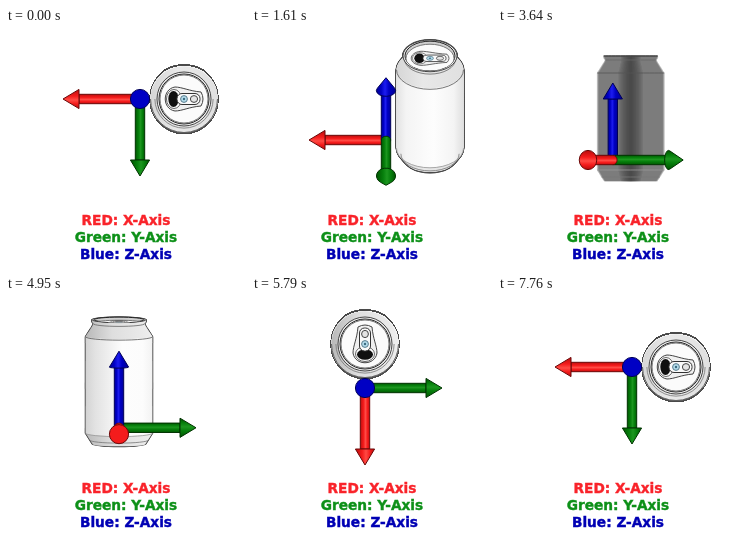
Write an HTML page with a canvas that moves like this. It is 240 by 240 pixels and loops after 7820 ms.

```html
<!DOCTYPE html>
<html lang="en">
<head>
<meta charset="utf-8">
<title>Can axes</title>
<style>
html, body { margin: 0; width: 100%; height: 100%; overflow: hidden; background: #fff; }
canvas { display: block; width: 240px; height: 240px; }
</style>
</head>
<body>
<canvas id="stage"></canvas>
<script>
const LOOP = 7820, STEP = 60, TURN = Math.PI / 30;
const CX = 134, CY = 92;
const ORIGIN = [0, -21, -40], CAN = [-44, -21];
const SHAFT = 61, TIP = 16;

// Can outline: height and radius, bottom to top
const PROFILE = [[-61, 27], [-58, 29], [-50, 34], [47, 34], [58, 27], [60, 26], [62, 27.5], [64, 27.5]];

const AXES = [
  { dir: [1, 0, 0], dark: '#b80c0c', mid: '#f41c1c', light: '#ff4a44', edge: '#6a0808' },
  { dir: [0, 1, 0], dark: '#005400', mid: '#067f0c', light: '#1c961f', edge: '#003200' },
  { dir: [0, 0, 1], dark: '#000094', mid: '#0000c4', light: '#1c1cf0', edge: '#000058' }
];
const LABELS = [
  ['RED: X-Axis', '#f9232a', 197],
  ['Green: Y-Axis', '#0d9018', 214],
  ['Blue: Z-Axis', '#0000b4', 231]
];

const canvas = document.getElementById('stage');
const ctx = canvas.getContext('2d');
const ratio = window.devicePixelRatio || 1;
canvas.width = canvas.height = 240 * ratio;

// Turned steps (0 to 15) of the move that starts at the given time
const steps = (t, start) => Math.max(0, Math.min(15, Math.floor((t - start) / STEP) + 1));

function makeView(t) {
  const tilt = (steps(t, 1130) - steps(t, 4950)) * TURN;
  const yaw = (steps(t, 3040) - steps(t, 6920)) * TURN;
  const ca = Math.cos(yaw), sa = Math.sin(yaw);
  const flat = Math.abs(Math.cos(tilt)), rise = Math.sin(tilt);
  // Screen x, screen y and depth toward the viewer
  const turn = ([x, y, z]) => {
    const px = y * sa - x * ca, py = x * sa + y * ca;
    return [px, py * flat - z * rise, py * rise + z * flat];
  };
  const place = p => {
    const [x, y] = turn(p);
    return [CX + x, CY + y];
  };
  return { flat, turn, place };
}

function oval(x, y, rx, ry, fill, stroke, from = 0, to = Math.PI * 2) {
  ctx.beginPath();
  ctx.ellipse(x, y, rx, Math.max(0, ry), 0, from, to);
  paint(fill, stroke);
}

function paint(fill, stroke) {
  if (fill) { ctx.fillStyle = fill; ctx.fill(); }
  if (stroke) { ctx.strokeStyle = stroke; ctx.stroke(); }
}

function ramp(x0, y0, x1, y1, ...stops) {
  const g = ctx.createLinearGradient(x0, y0, x1, y1);
  stops.forEach(([at, color]) => g.addColorStop(at, color));
  return g;
}

const gray = v => `rgb(${v}, ${v}, ${v})`;

function radiusAt(z) {
  const i = Math.max(1, PROFILE.findIndex(p => p[0] >= z));
  const [z0, r0] = PROFILE[i - 1], [z1, r1] = PROFILE[i];
  return r0 + (r1 - r0) * (z - z0) / (z1 - z0);
}

function drawCan(view) {
  const { flat } = view;
  const at = z => view.place([...CAN, z]);
  const [x] = at(0);
  // The shaded side of the can turns to the left with the yaw
  const shade = view.turn([0, 1, 0])[0];
  const body = ramp(x - 34, 0, x + 34, 0, [0, gray(226 - 16 * shade)], [0.15, gray(244 - 18 * shade)],
    [0.55, gray(253)], [0.85, gray(244 + 8 * shade)], [1, gray(222 + 20 * shade)]);
  const neck = ramp(x - 34, 0, x + 34, 0, [0, gray(214 - 30 * shade)], [0.4, gray(232 - 10 * shade)],
    [1, gray(224 + 14 * shade)]);
  for (const grow of [0.4, -0.5]) {
    for (let z = -61; z <= 64; z += 0.5) {
      const r = radiusAt(z) + grow;
      oval(x, at(z)[1], r, r * flat + grow, grow > 0 ? '#4a4a4a' : z > 47 || z < -50 ? neck : body);
    }
  }
  ctx.lineWidth = 0.8;
  for (const [z, color] of [[-57, '#777'], [-50, '#999'], [47, '#555'], [60, '#666']]) {
    const r = radiusAt(z) - 0.5;
    oval(x, at(z)[1], r, r * flat, null, color, 0, Math.PI);
  }
  drawLid(view, at(64), at(61));
}

function drawLid(view, [x, top], [, floor]) {
  const { flat } = view;
  ctx.lineWidth = 1;
  oval(x, top, 27, 27 * flat, '#f2f2f2', '#444');
  if (flat < 0.03) return;
  ctx.save();
  oval(x, top, 25, 25 * flat, '#cfcfcf', '#222');
  ctx.clip();
  oval(x, floor, 24, 24 * flat, '#fbfbfb', '#777');
  const u = view.turn([1, 0, 0]), v = view.turn([0, 1, 0]);
  ctx.transform(u[0], u[1], v[0], v[1], x, floor);
  drawTab();
  ctx.restore();
}

// Lid plane: the mouth lies toward +x, the tab toward -x
function drawTab() {
  ctx.lineWidth = 1;
  ctx.beginPath();
  ctx.moveTo(-17, -7);
  ctx.bezierCurveTo(-5, -8, 2, -12, 9, -12);
  ctx.bezierCurveTo(22, -10, 22, 10, 9, 12);
  ctx.bezierCurveTo(2, 12, -5, 8, -17, 7);
  ctx.quadraticCurveTo(-21, 0, -17, -7);
  paint('#f0f0f0', '#444');
  oval(10, 0, 7.5, 9.5, '#fff', '#666');
  oval(10.5, 0, 5.2, 8, '#101010');
  ctx.beginPath();
  ctx.roundRect(-16, -5.5, 23, 11, 5);
  paint('#fafafa', '#333');
  oval(-10, 0, 3.6, 3.4, '#e4e4e4', '#444');
  oval(0, 0, 3.4, 3.4, '#b4dcec', '#5a7c8c');
  oval(0, 0, 1.2, 1.2, '#3c6c80');
}

function drawArrow(view, axis) {
  const [dx, dy, depth] = view.turn(axis.dir);
  const len = Math.hypot(dx, dy), [x, y] = view.place(ORIGIN);
  const near = Math.max(0, depth);
  const across = r => ramp(0, -r, 0, r, [0, axis.dark], [0.25, axis.mid], [0.45, axis.light],
    [0.65, axis.mid], [1, axis.dark]);
  ctx.save();
  ctx.translate(x, y);
  ctx.rotate(Math.atan2(dy, dx));
  ctx.lineWidth = 1;
  const base = SHAFT * len;

  ctx.beginPath();
  ctx.ellipse(0, 0, 4.7 * near, 4.7, 0, Math.PI / 2, Math.PI * 1.5);
  ctx.lineTo(base, -4.7);
  ctx.lineTo(base, 4.7);
  ctx.closePath();
  paint(across(5), axis.edge);

  const r = 9.6, squash = r * near, reach = TIP * len;
  ctx.beginPath();
  if (reach > squash) {
    const a = Math.acos(squash / reach);
    ctx.moveTo(base + reach, 0);
    ctx.ellipse(base, 0, squash, r, 0, a, Math.PI * 2 - a);
    ctx.closePath();
  } else {
    ctx.ellipse(base, 0, squash, r, 0, 0, Math.PI * 2);
  }
  ctx.lineJoin = 'round';
  paint(len < 0.3 ? axis.mid : across(r), axis.edge);
  ctx.restore();
}

function drawLabels() {
  ctx.font = 'bold 13.7px "DejaVu Sans", sans-serif';
  ctx.textAlign = 'center';
  ctx.lineWidth = 0.4;
  for (const [text, color, y] of LABELS) {
    ctx.fillStyle = ctx.strokeStyle = color;
    ctx.fillText(text, 120, y);
    ctx.strokeText(text, 120, y);
  }
}

function frame(now) {
  const view = makeView(now % LOOP);
  ctx.setTransform(ratio, 0, 0, ratio, 0, 0);
  ctx.fillStyle = '#fff';
  ctx.fillRect(0, 0, 240, 240);
  drawCan(view);
  const depth = axis => view.turn(axis.dir)[2];
  [...AXES].sort((a, b) => depth(a) - depth(b)).forEach(axis => drawArrow(view, axis));
  drawLabels();
}

const start = performance.now();
function loop() {
  frame(performance.now() - start);
  requestAnimationFrame(loop);
}
loop();
</script>
</body>
</html>
```
